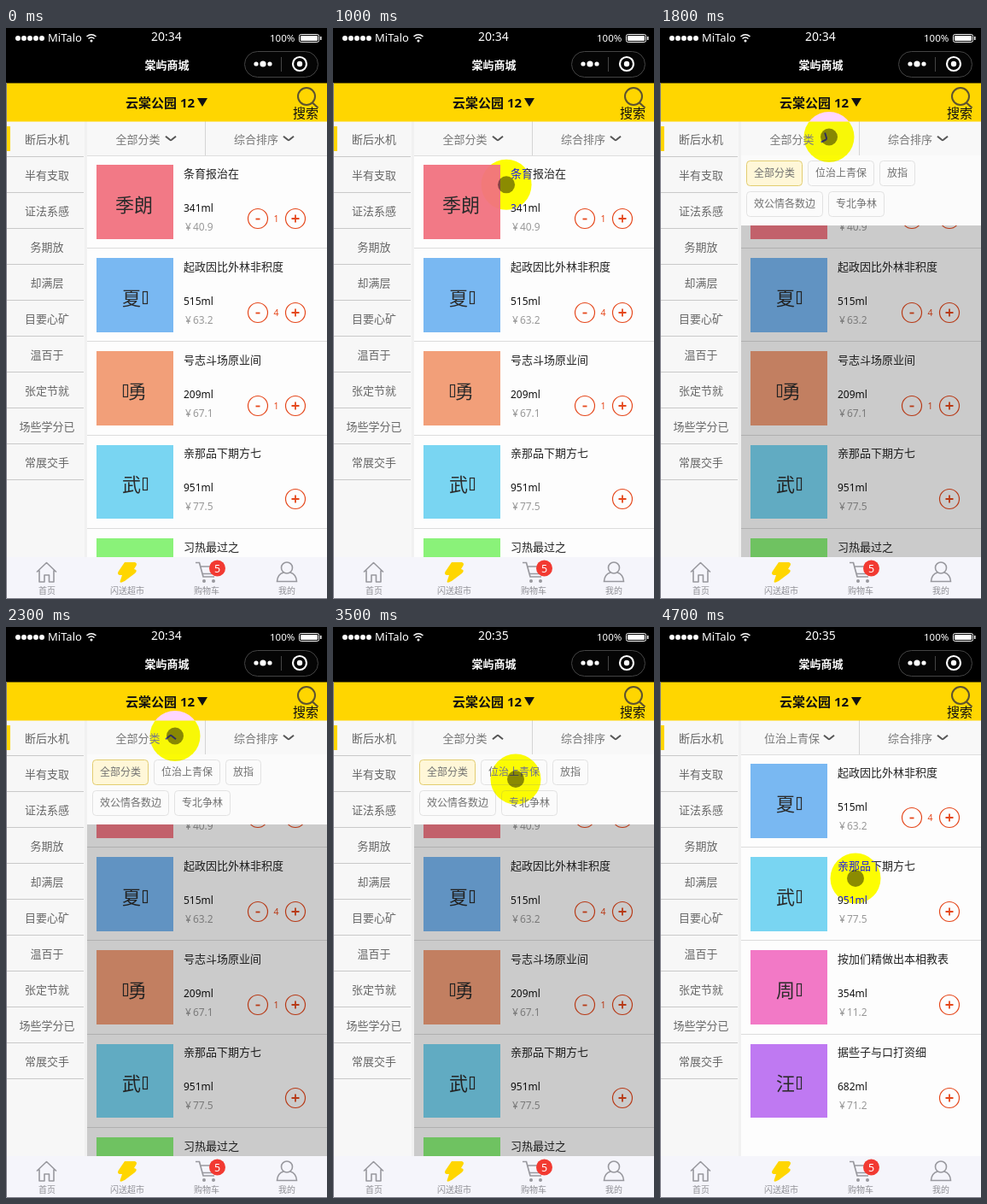
Animation of 376 by 668 pixels, one loop 5 s. Source, as an HTML page:

```html
<!DOCTYPE html>
<html lang="zh-CN">
<head>
<meta charset="utf-8">
<title>棠屿商城</title>
<style>
  html, body { margin: 0; width: 100%; height: 100%; overflow: hidden; background: #fdfdfd; }
  svg { display: block; width: 376px; height: 668px; font-family: "Noto Sans", "Noto Sans CJK SC", "Noto Sans CJK", sans-serif; }
  #halo { mix-blend-mode: difference; }
</style>
</head>
<body>
<svg id="stage" viewBox="0 0 376 668"></svg>
<script>
const YELLOW = '#ffd600', RED = '#e5481c';

const rect = (x, y, w, h, fill, extra = '') =>
  `<rect x="${x}" y="${y}" width="${w}" height="${h}" fill="${fill}" ${extra}/>`;
const circle = (x, y, r, fill, extra = '') =>
  `<circle cx="${x}" cy="${y}" r="${r}" fill="${fill}" ${extra}/>`;
const path = (d, stroke, width = 1, extra = '') =>
  `<path d="${d}" fill="none" stroke="${stroke}" stroke-width="${width}" ${extra}/>`;
// y is the vertical middle of the glyphs
const text = (s, x, y, size, fill, extra = '') =>
  `<text x="${x}" y="${y + size * .37}" font-size="${size}" fill="${fill}" ${extra}>${s}</text>`;
const MID = 'text-anchor="middle"', BOLD = 'font-weight="700"';
const label = (s, x, y, size, fill, extra = '') => text(s, x, y, size, fill, MID + ' ' + extra);

// name on the picture ("_" is a missing glyph), colour, title, volume, price, count
const goods = {
  ji: ['季朗', '#f27986', '条育报治在', 341, '40.9', 1],
  xia: ['夏_', '#79b8f2', '起政因比外林非积度', 515, '63.2', 4],
  yong: ['_勇', '#f29f79', '号志斗场原业间', 209, '67.1', 1],
  wu: ['武_', '#79d5f2', '亲那品下期方七', 951, '77.5', 0],
  xi: ['', '#8af279', '习热最过之', 300, '20.5', 0],
  zhou: ['周_', '#f279c6', '按加们精做出本相教表', 354, '11.2', 0],
  wang: ['汪_', '#bf79f2', '据些子与口打资细', 682, '71.2', 0]
};

function pictureName(s, y) {
  const ink = '#2b2b2b', light = 'font-weight="300"';
  if (!s.includes('_')) return label(s, 150, y, 22, ink, light);
  const first = s[0] === '_';
  return text(s.replace('_', ''), first ? 143 : 136, y, 22, ink, light) +
    rect(first ? 137.5 : 160.5, y - 7.5, 5, 14, 'none', `stroke="${ink}" stroke-width="1.2"`);
}

function product([name, color, title, volume, price, count], i) {
  const y = 159.9 + i * 109.25;
  const top = Math.round(y), bottom = Math.round(y + 86.8), mid = Math.round(y + 63.4), line = Math.floor(y + .2);
  const ring = x => circle(x, mid, 11.5, 'none', `stroke="${RED}" stroke-width="1.2"`);
  let s = i ? rect(95, top - 12, 281, 1, '#dcdcdc') : '';
  s += rect(106, top, 90, bottom - top, color) + pictureName(name, line + 47) +
    text(title, 208, line + 10, 13, '#222') +
    text(volume + 'ml', 208, line + 51, 12, '#111') +
    text(`¥<tspan dx="2">${price}</tspan>`, 210, line + 72.5, 12, '#999') +
    ring(339) + path(`M334.5 ${mid}h9m-4.5-4.5v9`, RED, 1.8);
  if (count) s += ring(295) + path(`M292.5 ${mid + .5}h5`, RED, 1.8) + label(count, 316.5, mid, 10.5, RED);
  return s;
}
const list = (id, keys) => `<g id="${id}">${keys.map((k, i) => product(goods[k], i)).join('')}</g>`;

function sidebar() {
  const names = ['断后水机', '半有支取', '证法系感', '务期放', '却满层', '目要心矿', '温百于', '张定节就', '场些学分已', '常展交手'];
  return rect(0, 109, 95, 510, '#f7f7f7') + rect(92, 109, 3, 510, '#f1f1f1') +
    names.map((n, i) => rect(1, 150 + i * 42, 90, 1, '#c9c9c9') + label(n, 48, 130 + i * 42, 13, '#666')).join('') +
    rect(0, 115, 5, 29, YELLOW);
}

const chevron = (id, x) => `<g id="${id}" transform="translate(${x} 129)">` +
  path('M-6-2.3L-1 1.8Q0 2.5 1 1.8L6-2.3', '#555', 2) + '</g>';

function filters() {
  return rect(95, 109, 281, 41, '#f8f8f8') + rect(95, 149, 281, 1, '#dedede') + rect(233, 109, 1, 40, '#d4d4d4') +
    label('全部分类', 154.5, 130, 13, '#777', 'id="category"') + chevron('arrow', 193) +
    label('综合排序', 293, 130, 13, '#777') + chevron('sort', 331);
}

function panel() {
  const chip = (s, x, y, on) =>
    rect(x + .5, y + .5, 17 + s.length * 12, 29, on ? '#fff7d8' : '#fbfbfb', `rx="4" stroke="${on ? '#e3cd70' : '#e2e2e2'}"`) +
    text(s, x + 9, y + 15, 12, '#707070');
  return '<g id="panel">' + rect(95, 149, 281, 82, '#fbfbfb') +
    chip('全部分类', 101, 155, true) + chip('位治上青保', 173, 155) + chip('放指', 257, 155) +
    chip('效公情各数边', 101, 191) + chip('专北争林', 197, 191) + '</g>';
}

function header() {
  let s = rect(0, 0, 376, 65, '#000');
  for (let i = 0; i < 5; i++) s += circle(14 + i * 7, 12, 3, '#fff');
  s += text('MiTalo', 49, 11, 13, '#fff') +
    path('M94.5 10Q100 5.5 105.5 10M96.5 12.5Q100 9.5 103.5 12.5', '#fff', 1.5) + circle(100, 15, 1.5, '#fff') +
    label('', 188, 10, 14, '#fff', 'id="clock"') + text('100%', 309, 12, 11.5, '#fff') +
    rect(343.5, 7.5, 23, 9, 'none', 'rx="2" stroke="#fff"') + rect(345, 9, 20, 6, '#fff', 'rx="1"') + rect(368, 10, 1.5, 4, '#fff') +
    label('棠屿商城', 188.5, 43, 13, '#fff', BOLD) +
    rect(279.5, 27.5, 86, 30, '#050505', 'rx="15" stroke="#444"') + rect(322, 34, 1, 17, '#444') +
    circle(293, 42, 2.6, '#fff') + circle(301, 42, 3.6, '#fff') + circle(309, 42, 2.6, '#fff') +
    circle(344, 42, 8, 'none', 'stroke="#fff" stroke-width="2.2"') + circle(344, 42, 3.2, '#fff');
  return s + rect(0, 64.5, 376, 45, YELLOW) + text('云棠公园 12', 140, 87, 15, '#111', BOLD) +
    '<path d="M224 82h12l-6 10z" fill="#111"/>' +
    circle(352, 80, 10, 'none', 'stroke="#5c5230" stroke-width="2"') + path('M359 87.5l6.5 6', '#5c5230', 2.2) +
    label('搜索', 351, 99, 15, '#111');
}

function tabs() {
  const gray = '#98989e';
  return rect(0, 619, 376, 49, '#f5f5fb') +
    path('M36 636.5L47.5 625.5 59 636.5M39 634.5V648h6v-8h5.5v8H56v-13.5', gray, 1.6, 'stroke-linejoin="round"') +
    `<path d="M139 625H151Q154 626 152.500 629L150 633Q155 634 151 638L139 647Q132 651 134 646L136 640H133Q130 639 131.500 636Z" fill="${YELLOW}"/>` +
    path('M222 625.5h4.5l4.5 16.5h13M228 630h18l-2.5 8.5h-13', gray, 1.7) +
    circle(232, 647, 2, gray) + circle(243, 647, 2, gray) +
    circle(247.5, 632, 9.5, '#f23a32') + label(5, 247.5, 632, 12.5, '#fff') +
    circle(329, 631.5, 6.5, 'none', `stroke="${gray}" stroke-width="1.6"`) +
    path('M325 637Q318 639 317.5 647.5H340.5Q340 639 333 637', gray, 1.6) +
    [['首页', 48], ['闪送超市', 142], ['购物车', 235], ['我的', 329]].map(([s, x]) => label(s, x, 658, 10, '#8f8f95')).join('');
}

// thin window border on the left and at the bottom
const border = path('M.5 64V667.5H376', '#7c7c88');

const $ = id => document.getElementById(id);
$('stage').innerHTML = rect(0, 0, 376, 668, '#fdfdfd') +
  list('all', ['ji', 'xia', 'yong', 'wu', 'xi']) + list('filtered', ['xia', 'wu', 'zhou', 'wang']) +
  rect(95, 150, 281, 469, '#000', 'id="mask" opacity=".2"') +
  sidebar() + filters() + panel() + header() + tabs() + border +
  circle(0, 0, 29.5, '#00f', 'id="halo"') + circle(0, 0, 10, '#000', 'id="dot" opacity=".45"');

// pointer stops: time, x, y
const stops = [
  [100, 400, 300], [300, 320, 338], [500, 214, 304], [1300, 198, 127.5], [2400, 198, 127.5],
  [2900, 214, 178], [3500, 214, 178], [4000, 227.5, 249], [4500, 229, 294], [5000, 229, 294]
];
const clamp = v => Math.min(1, Math.max(0, v));

function pointer(t) {
  const i = Math.max(1, stops.findIndex(s => s[0] > t));
  const [t0, x0, y0] = stops[i - 1], [t1, x1, y1] = stops[i];
  const p = clamp((t - t0) / (t1 - t0)), e = p * p * (3 - 2 * p);
  return `translate(${x0 + (x1 - x0) * e} ${y0 + (y1 - y0) * e})`;
}

const OPEN = 1700, CLOSE = 3800, TURN = 265;
const show = (id, on) => $(id).style.display = on ? '' : 'none';

function draw() {
  // the picture steps ten times a second and rests at the end
  const t = Math.min(4700, Math.floor(performance.now() % 5000 / 100) * 100);
  const open = t >= OPEN && t < CLOSE, done = t >= CLOSE;
  show('all', !done);
  show('filtered', done);
  show('mask', open);
  show('panel', open);
  $('category').textContent = done ? '位治上青保' : '全部分类';
  $('clock').textContent = t < 3500 ? '20:34' : '20:35';
  const angle = -180 * (clamp((t - OPEN) / TURN) - clamp((t - CLOSE) / TURN));
  $('arrow').setAttribute('transform', `translate(${done ? 198 : 193} 129) rotate(${angle})`);
  for (const id of ['halo', 'dot']) {
    show(id, t >= 100);
    $(id).setAttribute('transform', pointer(t));
  }
  requestAnimationFrame(draw);
}
draw();
</script>
</body>
</html>
```
